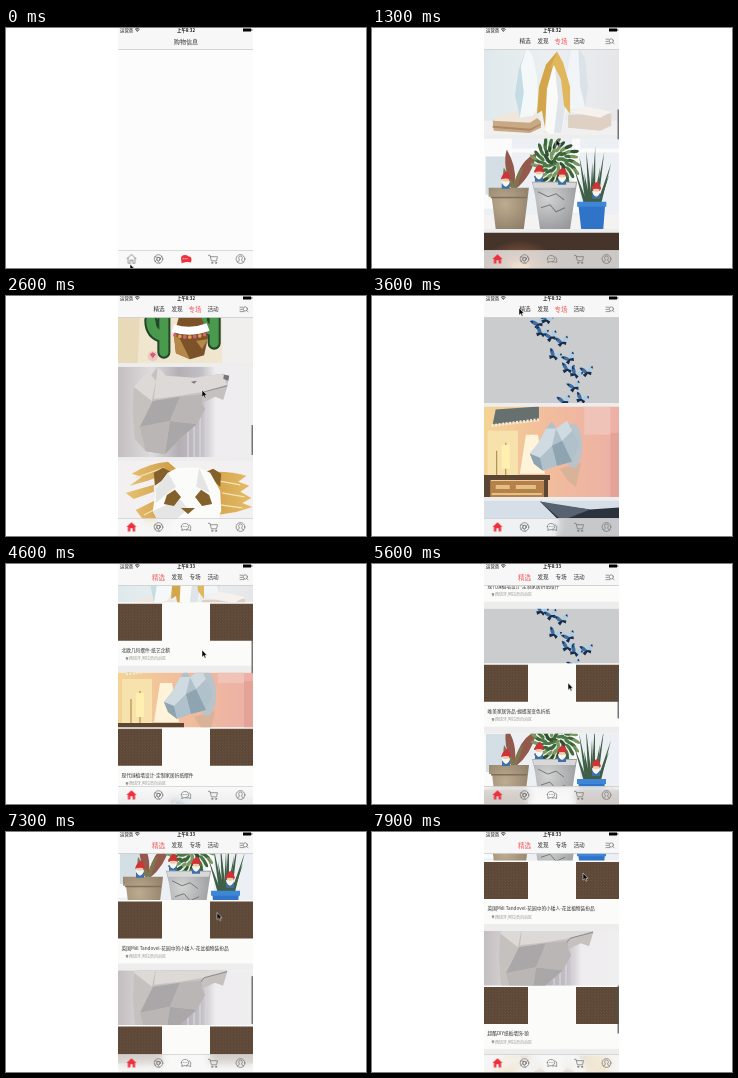
These frames come from a looping animation (360 px wide and 240 px high, 8000 ms). An HTML page:

```html
<!DOCTYPE html>
<html lang="zh-CN">
<head>
<meta charset="utf-8">
<title>手机商城</title>
<style>
@property --s { syntax: "<number>"; inherits: true; initial-value: 0; }
html, body { margin: 0; width: 100%; height: 100%; overflow: hidden; background: #fff; }
body { position: relative; }
body > svg { position: absolute; left: 0; top: 0; width: 360px; height: 240px; }
text { font-family: "Noto Sans CJK SC", "Noto Sans CJK", "Noto Sans", sans-serif; fill: #333; }
.mid { text-anchor: middle; }
.status { font-size: 4.4px; fill: #111; }
.tab { font-size: 5.6px; }
.on { font-size: 6.5px; fill: #f4585a; }
.title { font-size: 4.7px; }
.place { font-size: 4px; fill: #999; }
.line { fill: none; stroke: #777; stroke-width: .75; stroke-linejoin: round; stroke-linecap: round; }
.glass { position: absolute; left: 112px; top: 222px; width: 135px; height: 18px; background: rgba(248,248,248,.76); backdrop-filter: blur(4px); }

/* page and label switches */
.before-home { animation: before-home 8s step-end infinite; }
.home { animation: home 8s step-end infinite; }
.special { animation: special 8s step-end infinite; }
.picks { animation: picks 8s step-end infinite; }
.early { animation: early 8s step-end infinite; }
.late { animation: late 8s step-end infinite; }
@keyframes before-home { 0% { opacity: 1 } 5%, 100% { opacity: 0 } }
@keyframes home { 0% { opacity: 0 } 5%, 100% { opacity: 1 } }
@keyframes special { 0% { opacity: 0 } 5% { opacity: 1 } 46.25%, 100% { opacity: 0 } }
@keyframes picks { 0% { opacity: 0 } 46.25%, 100% { opacity: 1 } }
@keyframes early { 0% { opacity: 1 } 57.5%, 100% { opacity: 0 } }
@keyframes late { 0% { opacity: 0 } 57.5%, 100% { opacity: 1 } }

/* scrolling: --s is the distance, --k the bar travel per pixel */
.items { transform: translateY(calc((22 - var(--s)) * 1px)); }
.bar { fill: #555; transform: translateY(calc((22 + var(--s) * var(--k)) * 1px)); }
#special { --k: .148; animation: scroll-special 8s ease-out infinite; }
#picks { --k: .24; animation: scroll-picks 8s ease-out infinite; }
#special .bar { animation: bar-special 8s linear infinite; }
#picks .bar { animation: bar-picks 8s linear infinite; }
@keyframes scroll-special {
  0%, 6.25% { --s: 0 } 16.25% { --s: 381 } 19% { --s: 395 }
  32.5% { --s: 702 } 39%, 100% { --s: 945 }
}
@keyframes scroll-picks {
  0%, 51.25% { --s: 0 } 60% { --s: 185 } 70% { --s: 352 }
  77.5%, 82.5% { --s: 404 } 98.75%, 100% { --s: 548 }
}
@keyframes bar-special { 0%, 6% { opacity: 0 } 7%, 39% { opacity: 1 } 42%, 100% { opacity: 0 } }
@keyframes bar-picks { 0%, 51% { opacity: 0 } 52%, 100% { opacity: 1 } }

.cursor { animation: cursor 8s ease-out infinite; }
@keyframes cursor {
  0% { transform: translate(124px, 236px) }
  3.75%, 5% { transform: translate(125px, 230px) }
  9% { transform: translate(180px, 180px) }
  16.25% { transform: translate(184px, 111px) }
  22% { transform: translate(196px, 180px) }
  32.5%, 36% { transform: translate(196px, 94px) }
  43%, 47.5% { transform: translate(147px, 12px) }
  52% { transform: translate(196px, 185px) }
  60% { transform: translate(196px, 70px) }
  64% { transform: translate(196px, 175px) }
  70% { transform: translate(196px, 119px) }
  77.5% { transform: translate(205px, 67px) }
  81.25%, 82.5% { transform: translate(211px, 185px) }
  98.75%, 100% { transform: translate(211px, 41px) }
}
</style>
</head>
<body>
<svg viewBox="0 0 360 240">
  <defs>
    <linearGradient id="peach"><stop stop-color="#f3d494"/><stop offset=".45" stop-color="#f2bd9c"/><stop offset="1" stop-color="#ecb0a6"/></linearGradient>
    <linearGradient id="gold"><stop stop-color="#e6c274"/><stop offset=".5" stop-color="#c8923a"/><stop offset="1" stop-color="#e5bd66"/></linearGradient>
    <linearGradient id="room"><stop stop-color="#dfe9ec"/><stop offset=".5" stop-color="#ebeff1"/><stop offset="1" stop-color="#e6e6e9"/></linearGradient>
    <linearGradient id="curtain"><stop stop-color="#c3bfc0"/><stop offset=".25" stop-color="#dedbdc"/><stop offset=".45" stop-color="#b3afb5"/><stop offset=".62" stop-color="#c3bfc6"/><stop offset=".72" stop-color="#eeecee"/><stop offset="1" stop-color="#f0eff0"/></linearGradient>
    <radialGradient id="glow"><stop stop-color="#b9753f"/><stop offset="1" stop-color="#46342b"/></radialGradient>
    <radialGradient id="pot" cx=".35" cy=".35" r=".75"><stop stop-color="#d3d3d3"/><stop offset="1" stop-color="#96989b"/></radialGradient>
    <radialGradient id="clay" cx=".4" cy=".4" r=".75"><stop stop-color="#beac91"/><stop offset="1" stop-color="#8d7c66"/></radialGradient>
    <pattern id="brown" width="3" height="3" patternUnits="userSpaceOnUse">
      <path fill="#5d4838" d="M0 0h3v3H0z"/><path fill="#67513f" d="M0 0h1v1H0zM2 2h1v1H2z"/>
    </pattern>

    <g id="fly">
      <path fill="#3a6ea6" d="M0 1C-2-3-5-5-7-4-6 0-3 3 0 3Z"/>
      <path fill="#a9cde6" d="M0 1C1-3 4-5 6-4 6 0 3 3 0 3Z"/>
      <path fill="#1b2c49" d="M0 1-5 3-3 6 0 3 3 5 4 2ZM-7-4-4-3-5-1ZM6-4 4-3 6-1Z"/>
    </g>
    <g id="gnome">
      <path fill="#3f6fa8" d="M-4 5Q0 2 4 5V10H-4Z"/>
      <circle cy="2" r="3.2" fill="#f0c8ae"/>
      <path fill="#f7f5f0" d="M-4 2Q0 4 4 2 4 6 0 8-4 6-4 2Z"/>
      <path fill="#d03336" d="M-5 1Q-3-6 1-7 4-5 5 1 0-1-5 1Z"/>
    </g>

    <symbol id="penguins" viewBox="0 0 135 90" preserveAspectRatio="xMidYMid slice">
      <path fill="url(#room)" d="M0 0h135v90H0z"/><path fill="#f0f0f0" d="M0 76h135v14H0z"/>
      <path fill="#c9a884" d="M9 75 53 73 57 77V83L46 88 10 86Z"/><path fill="#efe6dc" d="M12 72 34 66 57 71 46 78 9 76Z"/>
      <path fill="#ab8866" d="M9 81 46 84 57 79V80L46 86 9 83Z"/>
      <path fill="#dfd0c4" d="M84 70 127 69V81L116 86 84 83Z"/><path fill="#f4f1ee" d="M84 67 104 62 127 67 116 73Z"/>
      <path fill="#f5f8f9" d="M43 3 49 12 53 32 54 62 49 71 36 73 31 50 35 24Z"/>
      <path fill="#c5dce5" d="M43 3 37 22 40 48 36 73 31 50 35 24Z"/>
      <path fill="#f2f5f7" d="M87 5 94 1 101 14 104 42 101 63 86 65 83 30Z"/>
      <path fill="#dbe3e8" d="M94 1 101 14 104 42 101 63 96 42Z"/>
      <path fill="#d4a64c" d="M73 7 62 20 55 42 53 69 58 66 62 88 66 48Z"/>
      <path fill="#fafaf8" d="M70 18 63 44 61 86 66 89 77 88 83 60 77 24Z"/>
      <path fill="#dfe4e8" d="M71 24 74 54 70 88 77 88 82 58 77 24Z"/>
      <path fill="#e0b75c" d="M73 7 79 18 86 42 86 69 80 61 77 35 70 21 66 24Z"/>
    </symbol>

    <symbol id="gnomes" viewBox="0 0 135 90" preserveAspectRatio="xMidYMid slice">
      <path fill="#eceff3" d="M0 0h135v90H0z"/><path fill="#fbfbfc" d="M0 0h28v70H0zM88 0h8v74h-8zM0 10h135v4H0z"/>
      <path fill="#d3dfe4" d="M2 18h22v38H2z"/><path fill="#f5f3f1" d="M0 76h135v14H0z"/>
      <path fill="#93594c" d="M29 50Q18 28 23 11 33 28 31 44 36 22 53 14 48 38 31 51Z"/>
      <path fill="#7c7750" d="M28 50Q17 40 20 29L30 45Q34 32 40 28L32 51Z"/>
      <g id="bush"></g>
      <g id="aloe" fill="#3f5f46"></g>
      <path fill="url(#clay)" d="M5 49h40l-1 9-4 32H12L8 58H5Z"/><path fill="#7f705c" d="M7 58h36v1.5H7z"/>
      <path fill="url(#pot)" d="M48 43h45l-2 13-5 34H56L51 56Z"/><path fill="#d8d8d8" d="M49 44h43l-1 5H50z"/><path fill="none" stroke="#777a7d" d="m54 53 10 5 8-3 8 6M57 69l9-3 6 7 9-4"/>
      <path fill="#2f74c9" d="M94 64h27l-2 26H97Z"/><path fill="#3f86d6" d="M93 63h29v5H93z"/>
      <use href="#gnome" x="22" y="40"/><use href="#gnome" x="55" y="33"/><use href="#gnome" x="78" y="36"/><use href="#gnome" x="112" y="50"/>
    </symbol>

    <symbol id="candle" viewBox="0 0 135 90" preserveAspectRatio="xMidYMid slice">
      <path fill="#46342b" d="M0 0h135v90H0z"/><ellipse cx="36" cy="40" rx="40" ry="32" fill="url(#glow)"/>
      <path fill="#e9a55b" d="M28 30h18v35H28z"/><path fill="#2b201b" d="M0 72h135v18H0z"/>
    </symbol>

    <symbol id="cactus" viewBox="0 0 135 90" preserveAspectRatio="xMidYMid slice">
      <path fill="#f1efee" d="M0 0h135v90H0z"/><path fill="#f0e6cd" d="M0 0h104v90H0z"/><path fill="#e8d9b8" d="M0 0h24l-4 90H0z"/>
      <g fill="none" stroke-linecap="round" stroke-linejoin="round">
        <path id="stems" stroke="#24452b" stroke-width="13" d="M46 79V45M33 47Q33 61 46 64M96 70V36M84 44Q84 56 96 58"/>
        <path stroke="#4a9a4e" stroke-width="9" d="M46 79V45M33 47Q33 61 46 64M96 70V36M84 44Q84 56 96 58"/>
      </g>
      <path fill="#7c5229" d="M62 40 82 40 90 64 86 82 72 86 58 80 56 62Z"/>
      <path fill="#b58748" d="M62 66 72 86 58 80 56 62ZM78 68 90 66 84 76Z"/>
      <path fill="none" stroke="#fff" stroke-width="8" d="M55 55Q72 61 90 54"/>
      <g fill="none" stroke-width="3.8" stroke-linecap="round">
        <path stroke="#d0647c" stroke-dasharray="0 10" d="M57 62Q72 67 91 60"/><path stroke="#e2a24b" stroke-dasharray="0 10" stroke-dashoffset="5" d="M57 62Q72 67 91 60"/>
      </g>
      <circle cx="35" cy="83" r="5" fill="#edc6c2"/><path fill="#d85c70" d="m32 81 3-2 3 2-3 4Z"/>
    </symbol>

    <symbol id="wolf" viewBox="0 0 135 90" preserveAspectRatio="xMidYMid slice">
      <path fill="url(#curtain)" d="M0 0h135v90H0z"/>
      <path stroke="#d5d2d8" stroke-width="1.5" d="M70 40v50M76 40v50M82 40v50M88 34v56"/>
      <path fill="#c4c1bf" d="M16 20 30 4 33 9 40 0 48 9 76 11 104 7 111 9 109 20 105 33 97 30 84 36 87 42 79 57 64 70 47 87 28 84 17 72 15 46Z"/>
      <path fill="#dcd9d7" d="M30 4 38 14 34 34 16 20ZM48 9 76 11 62 29 36 32 40 0ZM76 11 104 7 109 18 86 25 62 29Z"/>
      <path fill="#aaa7a8" d="M35 34 62 30 52 54 22 60ZM52 54 79 57 64 70 47 87Z"/>
      <path fill="#b9b6b5" d="M62 30 84 28 84 36 87 42 79 57 52 54ZM22 60 52 54 47 87 28 84Z"/>
      <path fill="#77757a" d="m106 8 5 1-1 5-5-2ZM73 15l6-1-3 3Z"/><path fill="none" stroke="#8d8a8d" d="m109 19-23 6-3 4"/>
    </symbol>

    <symbol id="panda" viewBox="0 0 135 90" preserveAspectRatio="xMidYMid slice">
      <path fill="#f2f0f0" d="M0 0h135v90H0z"/>
      <path fill="url(#gold)" d="M14 13Q32 2 50 1L58 8 38 17 30 20 12 25 24 16ZM83 12Q108 9 128 15L120 21 131 25 122 31 133 37 124 42 134 46 118 51 92 55ZM8 32 36 24V31L16 38ZM18 49 40 38 44 50 56 60 28 62Z"/>
      <path fill="none" stroke="#f5e3ba" stroke-width="1.2" d="M18 17 46 7M100 20 122 24M104 32 126 36M102 44 124 47M26 54 42 46"/>
      <path fill="#84602a" d="M37 25 36 12 45 7 55 12ZM86 12 95 8 103 13 102 26Z"/>
      <path fill="#fbfbfa" d="M50 12 60 7H81L92 12 102 30 103 50 95 70 70 82 45 70 35 50 38 28Z"/>
      <path fill="#e5e5e5" d="m50 12 8 14-20 16V28ZM81 7 78 26l14 6ZM62 38l8 10-25 22-10-20Z"/>
      <path fill="#84602a" d="m46 43 3-9 8-5 6 7-7 9ZM94 43l-3-9-8-5-6 7 7 9ZM63 47h14l-7 6Z"/>
    </symbol>

    <symbol id="flies" viewBox="0 0 135 90" preserveAspectRatio="xMidYMid slice">
      <path fill="#cbcccd" d="M0 0h135v90H0z"/><g id="swarm"></g>
    </symbol>

    <symbol id="rhino" viewBox="0 0 135 90" preserveAspectRatio="xMidYMid slice">
      <path fill="url(#peach)" d="M0 0h135v90H0z"/><path fill="#f0c3b9" d="M100 0h26v28h-26z"/><path fill="#e4a399" d="M126 26h9v64h-9z"/>
      <path fill="#66706f" d="M12 3 55 0V13L9 18Z"/><path fill="none" stroke="#f2ead7" stroke-width="3" stroke-dasharray="2 1.5" d="M8 19 56 13"/>
      <path fill="#f7e2ae" d="M4 24h30v44H4z"/>
      <path fill="#fff3da" d="M42 28h12l7 39H36Z"/>
      <path fill="none" stroke="#a78038" d="M13 69V44M22 36v33M14 69h16"/><path fill="#fff0b0" d="M18 38h8v24h-8z"/>
      <path fill="#5b4633" d="M0 68h66v5H0zM0 73h7v17H0zM60 73h4v17h-4z"/><path fill="#b5804a" d="M7 74h53v16H7z"/>
      <path fill="#e3c084" d="M12 78h14v4H12zM32 78h20v4H32zM8 86h50v2H8z"/>
      <path fill="#d9b397" d="M76 62 97 56 92 80 84 74Z"/>
      <ellipse cx="89" cy="39" rx="9" ry="22" fill="#b8c3ca"/>
      <path fill="#b0c1cb" d="M62 22 68 15 72 22 83 14 88 24 95 38 88 55 73 59 59 64 50 57 46 47 54 37Z"/>
      <path fill="#cfdbe1" d="M62 22 72 22 68 39 54 37ZM83 14 88 24 78 34 72 22ZM54 37 68 39 56 51 46 47Z"/>
      <path fill="#8fa4b1" d="m68 39 10-5 10 21-15 4ZM46 47l10 4 3 13-9-7Z"/>
    </symbol>

    <symbol id="raven" viewBox="0 0 135 90" preserveAspectRatio="xMidYMid slice">
      <path fill="#d6dfe7" d="M0 0h135v90H0z"/>
      <path fill="#2b323c" d="M56 1 74 5 106 9 135 7V42L96 70 66 58 76 21Z"/><path fill="#56626f" d="M56 1 106 9 78 20Z"/>
    </symbol>
  </defs>

  <svg x="112" width="135" height="240">
    <path fill="#fcfcfc" d="M0 0h135v240H0z"/>
    <g class="special">
      <path fill="#ededed" d="M0 22h135v218H0z"/>
      <g id="special"><g class="items"></g><rect class="bar" x="133.6" y="3" width="1.2" height="30" rx=".6"/></g>
    </g>
    <g class="picks">
      <path fill="#ededed" d="M0 22h135v218H0z"/>
      <g id="picks"><g class="items"></g><rect class="bar" x="133.6" width="1.2" height="48" rx=".6"/></g>
    </g>

    <path fill="#f7f7f7" d="M0 0h135v21.5H0z"/><path fill="#c9c9c9" d="M0 21.3h135v.6H0z"/>
    <text class="status" x="2" y="3.7">运营商</text>
    <path class="line" style="stroke:#111" d="M17.3 1.1q2-1.5 4 0M18.3 2.3q1-.7 2 0M19.3 3.3h.1"/>
    <g class="early"><text class="status mid" x="68" y="3.8" font-weight="700">上午8:32</text></g>
    <g class="late"><text class="status mid" x="68" y="3.8" font-weight="700">上午8:33</text></g>
    <path d="M125 .5h8v3h-8zM133.4 1.2h.8v1.6h-.8z"/>

    <text class="before-home mid" x="68" y="15.7" font-size="6.1">购物信息</text>
    <g class="home mid">
      <text class="tab" x="59" y="15.3">发现</text><text class="tab" x="95" y="15.3">活动</text>
      <path class="line" d="M122 11.2h2.8M122 13.4h2.4M122 15.6h4M128.8 14.6l1.3 1.3"/><circle class="line" cx="127.3" cy="12.9" r="2.1"/>
    </g>
    <g class="special mid"><text class="tab" x="41" y="15.3">精选</text><text class="on" x="77" y="15.6">专场</text></g>
    <g class="picks mid"><text class="on" x="40.5" y="15.6">精选</text><text class="tab" x="77" y="15.3">专场</text></g>
  </svg>
</svg>

<div class="glass"></div>

<svg viewBox="0 0 360 240">
  <path fill="#b9b9b9" d="M112 222h135v.6H112z"/>
  <g transform="translate(125.5 231)">
    <path class="line before-home" d="M-4.5-.3 0-4.5 4.5-.3M-3.3-1.2V4.3H-1.2V1H1.2V4.3H3.3V-1.2"/>
    <path class="home" fill="#ee2f3c" d="M-5 0 0-4.8 5 0H3.6V4.4H1.2V1.2H-1.2V4.4H-3.6V0Z"/>
  </g>
  <g class="line" transform="translate(152.5 231)"><circle r="4.3"/><circle r="1.7"/><path d="M-3.6-2.2 1.2-1.2M3.2-2.8 1 1.4M-3.2 2.8-1.6-.4M.8 4.1-1 1.4"/></g>
  <g transform="translate(180 231)">
    <g class="before-home" fill="#ee2f3c"><ellipse cx="-1" cy="-.3" rx="4" ry="3.6"/><path d="M-4.5 1.5V4.2L0 2.8ZM2.5-2.8Q6-2.3 5.4 1.2L5 3.4 1 2.8Z"/><path fill="#fff" d="M-3.3-.7h.9v.9h-.9zM-1.4-.7h.9v.9h-.9zM.5-.7h.9v.9H.5z"/></g>
    <g class="home"><path class="line" d="M-4.7-.5C-4.7-4.6 2.7-4.6 2.7-.5 2.7 2.4-.5 3-2 2.6L-4.2 3.6-3.9 1.7Q-4.7 1-4.7-.5M3.2-2.3Q5.8-1 4.6 1.7V3.6L2.7 2.8.3 3"/><path class="line" d="M-2.8-.5h.1M-1-.5h.1M.8-.5h.1"/></g>
  </g>
  <g class="line" transform="translate(207 231)"><path d="M-4.6-3.7H-3L-1.6 1.8H3.5L4.5-2.3H-2.5"/><circle cx="-.8" cy="3.8" r=".7"/><circle cx="3" cy="3.8" r=".7"/></g>
  <g class="line" transform="translate(234.5 231)"><circle r="4.4"/><path d="M-2.9 3.2Q-2.5 1.7-1 1.3-3-2.8 0-3 3-2.8 1 1.3 2.5 1.7 2.9 3.2"/></g>
  <path class="cursor" stroke="#fff" stroke-width=".5" d="M0 0V7.2L1.7 5.7 2.9 8.2 4 7.7 2.9 5.3H5Z"/>
</svg>

<script>
const fill = (sel, list, draw) => { document.querySelector(sel).innerHTML = list.map(draw).join(''); };

// x, y, turn
const swarm = [[54, 10, -20], [63, 6, 15], [58, 19, 20], [67, 23, -15], [78, 28, -10], [71, 42, 25], [85, 45, -25],
  [84, 55, 10], [92, 60, 30], [103, 58, -10], [90, 73, -15], [98, 85, 20], [80, 87, -10]];
fill('#swarm', swarm, ([x, y, a]) => `<use href="#fly" transform="translate(${x} ${y}) rotate(${a})"/>`);

// leaves spread in a spiral, dark ones alternating with light ones
const greens = ['#2f5230', '#4d7a43', '#3d6639', '#78995f'];
fill('#bush', [...Array(64).keys()], i => {
  const a = i * 2.4, r = 23 * Math.sqrt(i / 64);
  const x = 71 + r * Math.cos(a), y = 24 + r * Math.sin(a);
  return `<ellipse rx="4.2" ry="1.7" fill="${greens[i % 4]}" transform="translate(${x} ${y}) rotate(${a * 57.3 + 25})"/>`;
});

const tips = [[90, 30], [95, 17], [100, 34], [102, 12], [108, 24], [111, 8], [116, 28], [120, 13], [125, 36], [127, 24]];
fill('#aloe', tips, ([x, y], i) => `<path d="M${100 + i * 1.4} 66 ${x} ${y} ${104 + i * 1.4} 66Z"/>`);

const specials = 'rhino flies raven panda penguins gnomes candle cactus wolf panda flies rhino raven penguins'.split(' ');
fill('#special .items', specials, (id, i) => `<use href="#${id}" y="${i * 94 - .5}" width="135" height="90.5"/>`);

const cards = [
  ['cactus', '创意手工摆件-仙人掌装饰'],
  ['penguins', '北欧几何摆件-纸艺企鹅'],
  ['rhino', '现代绿植墙设计-定制家居折纸摆件'],
  ['flies', '唯美家居饰品-蝴蝶渐变色折纸'],
  ['gnomes', '英国Mill Tandovel-花园中的小矮人-花盆植物装扮品'],
  ['wolf', '超酷DIY纸板墙饰-狼'],
  ['panda', '超酷DIY纸板墙饰-熊猫'],
];
fill('#picks .items', cards, ([id, title], i) => `<g transform="translate(0 ${i * 125})">
  <path fill="#fbfbfa" d="M0 0h135v118H0z"/>
  <use href="#${id}" width="135" height="54.5"/>
  <path fill="url(#brown)" d="M0 56h44v37H0zM92 56h43v37H92z"/>
  <text class="title" x="3.5" y="104.3">${title}</text>
  <path fill="#999" d="M9 112.8Q6.2 109.3 9 109.2 11.8 109.3 9 112.8"/>
  <text class="place" x="11" y="112.6">西班牙,阿拉贡自治区</text></g>`);
</script>
</body>
</html>
```
